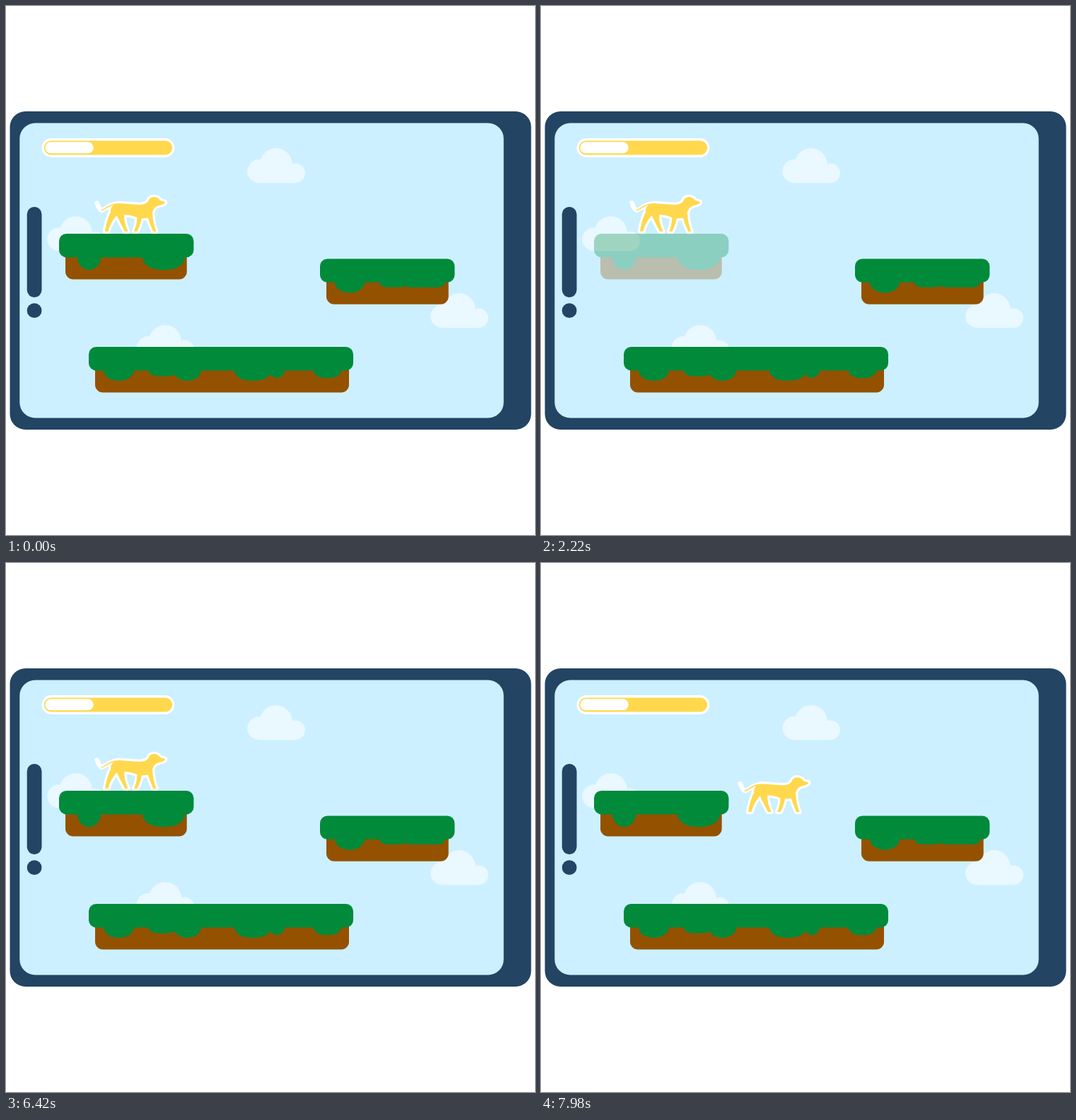
Animation of 748x748 px, one loop 8000 ms. Source, as an HTML page with a canvas:

```html
<!DOCTYPE html>
<html lang="en">
<head>
<meta charset="utf-8">
<title>Platform game</title>
<style>
  html, body { margin: 0; width: 100%; height: 100%; overflow: hidden; background: #fff; }
  canvas { display: block; }
</style>
</head>
<body>
<canvas id="stage" width="748" height="748"></canvas>
<script>
const SIZE = 748, LOOP = 8000;
const NAVY = '#234463', SKY = '#ccf0ff', CLOUD = '#eaf8ff', YELLOW = '#ffd84d',
      GREEN = '#008a3a', BROWN = '#945200';
const stage = document.getElementById('stage').getContext('2d');

function layer(draw) {
  const canvas = document.createElement('canvas');
  canvas.width = canvas.height = SIZE;
  draw(canvas.getContext('2d'));
  return canvas;
}

function box(c, color, x, y, width, height, radius) {
  c.fillStyle = color;
  c.beginPath();
  c.roundRect(x, y, width, height, radius);
  c.fill();
}

// A pill with its ends fully rounded.
function pill(c, color, x, y, width, height) {
  box(c, color, x, y, width, height, Math.min(width, height) / 2);
}

function disc(c, color, x, y, radius) {
  pill(c, color, x - radius, y - radius, radius * 2, radius * 2);
}

// Placed by the left end of its flat base.
function cloud(c, x, base) {
  disc(c, CLOUD, x + 16.5, base - 16.5, 16.5);
  disc(c, CLOUD, x + 40.5, base - 26, 23);
  disc(c, CLOUD, x + 68, base - 13.8, 13.8);
  c.fillRect(x + 16.5, base - 26, 51.5, 26);
}

// Each drip is [offset, width, depth]; its lower corners are elliptical.
function platform(x, y, grassWidth, soilWidth, drips) {
  const thick = 33.4;
  return layer(c => {
    box(c, BROWN, x + 9, y + 16, soilWidth, 48.4, 11);
    box(c, GREEN, x, y, grassWidth, thick, 10.5);
    for (const [offset, width, depth] of drips) {
      const corner = { x: Math.min(width / 2, depth * 1.5), y: depth };
      box(c, GREEN, x + offset, y + thick - 1, width, depth + 1, [0, 0, corner, corner]);
    }
  });
}

const backdrop = layer(c => {
  c.fillStyle = '#fff';
  c.fillRect(0, 0, SIZE, SIZE);
  box(c, NAVY, 5.5, 149, 737, 450, 22);
  box(c, SKY, 19.3, 165.5, 684.4, 417, 22);
  pill(c, NAVY, 29.7, 284, 20.8, 128);
  disc(c, NAVY, 40.1, 430.7, 10.4);
  cloud(c, 341.2, 250.1);
  cloud(c, 58.2, 346.3);
  cloud(c, 600.2, 455.1);
  cloud(c, 184.5, 500.1);
  pill(c, '#fff', 50.5, 187, 187.8, 27);
  pill(c, YELLOW, 53.7, 190.5, 181.5, 20);
  pill(c, '#fff', 55.3, 192.3, 68.5, 16);
});

const upper = platform(75, 322, 190.4, 171.7, [[26, 33, 17.8], [118, 60, 17.8]]);
const right = platform(444, 357.4, 190.4, 172.7, [[21, 42, 14.7], [84, 40, 7], [118, 59, 7.2]]);
const lower = platform(117, 482, 374, 359,
  [[21, 43, 14.5], [85, 40, 8], [120, 39, 14.5], [206, 52, 14.3], [255, 22, 10.5], [318, 39, 10.5]]);

const dog = new Path2D('M148 288Q150 279 160 279L188 281Q198 281 201 276Q203 270 209 270'
  + 'Q215 270 218 275L225 277Q225 280 218 281.5Q211 283 209 287Q206 292 205 298'
  + 'Q196 302 185 299Q176 295 166 295L148 297Z');
const tail = new Path2D('M156 280.3C146 280 142 287 135.5 288.8');
const tailTip = new Path2D('M135.5 288.8C131 288.5 130.5 282 128.5 278.5');

// Tapers from the hip, bends towards the knee and ends in a small foot.
function addLeg(hip, width, knee, foot) {
  const hipY = 293, kneeY = 307, footY = 318.7;
  dog.moveTo(hip + width, hipY);
  dog.quadraticCurveTo(knee + 2.5, kneeY, foot + 3.5, footY);
  dog.lineTo(foot - 1, footY);
  dog.quadraticCurveTo(knee - 2.5, kneeY, hip - width, hipY);
}
addLeg(153, 6, 144, 141);
addLeg(161, 6, 164, 169);
addLeg(189, 4, 189, 182);
addLeg(203, 4, 205, 209);

function stroke(color, width, path) {
  stage.strokeStyle = color;
  stage.lineWidth = width;
  stage.stroke(path);
}

function drawDog(x, y) {
  stage.save();
  stage.translate(x, y);
  stage.lineCap = stage.lineJoin = 'round';
  for (const path of [tail, tailTip, dog]) stroke('#fff', 6.4, path);
  stroke(YELLOW, 1.6, tail);
  stage.fillStyle = YELLOW;
  stage.fill(dog);
  stage.restore();
}

function easeInOut(p) {
  const rise = p ** 1.75, fall = (1 - p) ** 1.75;
  return rise / (rise + fall);
}

// Fades out and back in, `count` times, each half lasting `half` ms.
function blink(t, start, half, count) {
  const phase = (t - start) / half;
  if (phase <= 0 || phase >= 2 * count) return 1;
  return easeInOut(Math.abs(1 - phase % 2));
}

// Speeds up along the ledge, then hops off and falls.
function dogPosition(t) {
  const run = Math.max(0, t - 6380) / 1000;
  const air = (t - 7410) / 1000;
  if (air < 0) {
    const lift = Math.max(0, t - 7330) / 80;
    return [73.5 * run * run, -lift * lift];
  }
  return [78 + 151 * air - 34 * air * air, -1 - 25 * air + 261 * air ** 3];
}

function drawLayer(image, alpha = 1) {
  stage.globalAlpha = alpha;
  stage.drawImage(image, 0, 0);
  stage.globalAlpha = 1;
}

const origin = performance.now();

function frame(now) {
  const t = Math.max(0, now - origin) % LOOP;
  drawLayer(backdrop);
  drawLayer(upper, blink(t, 483, 666, 2));
  drawLayer(lower, blink(t, 3147, 1333, 1));
  drawLayer(right);
  drawDog(...dogPosition(t));
  requestAnimationFrame(frame);
}
frame(origin);
</script>
</body>
</html>
```
